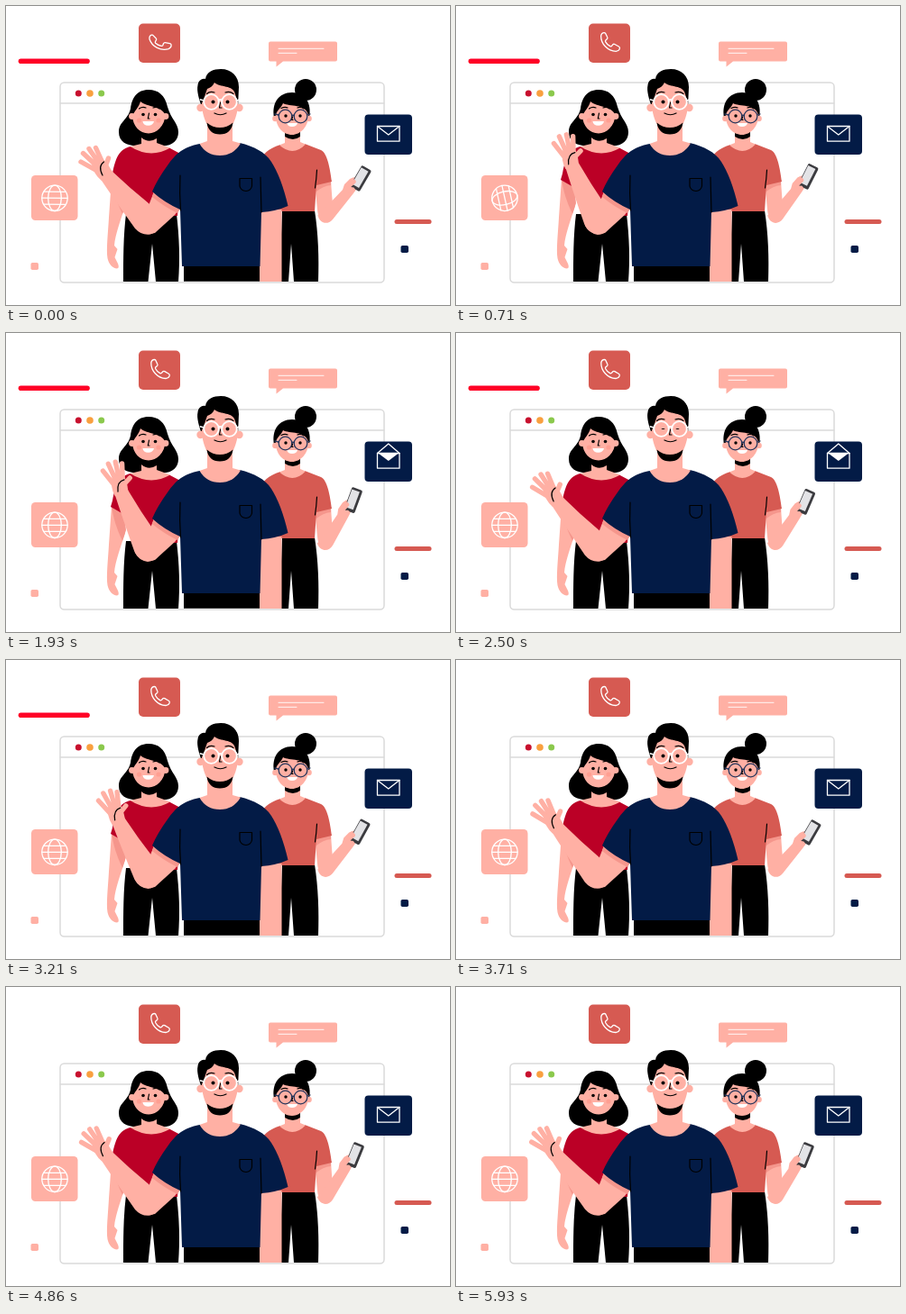
An HTML page for the animation above (6 s loop, 492x332 px).

```html
<!DOCTYPE html>
<html lang="en">
<head>
<meta charset="utf-8">
<title>Team greeting</title>
<style>
html, body { margin: 0; width: 100%; height: 100%; overflow: hidden; background: #fff; }
svg { display: block; width: 100%; height: 100%; fill: none; stroke-linecap: round; stroke-linejoin: round; }
.skin { fill: #ffb0a4; }
.shade { fill: #f5968c; }
.coral { fill: #d65a52; }
.red { fill: #bb0026; }
.navy { fill: #031b46; }
.ink { fill: #000; }
.white { fill: #fff; }
.line { stroke: #000; stroke-width: 1.2; }
.icon { stroke: #fff; stroke-width: 1.3; }
.finger { stroke: #ffb0a4; stroke-width: 5.4; }
.frame { stroke: #dadada; stroke-width: 1.5; }
</style>
</head>
<body>
<svg viewBox="0 0 492 332">
  <!-- browser window -->
  <rect class="frame" x="60" y="85" width="359" height="222" rx="4.5" fill="#fff"/>
  <path class="frame" d="M60 108H419"/>
  <circle cx="80.3" cy="97" r="3.5" fill="#c8102e"/>
  <circle cx="93" cy="97" r="3.8" fill="#f9a03f"/>
  <circle cx="105.7" cy="97" r="3.5" fill="#8bc94d"/>

  <!-- loose shapes -->
  <path id="bar" d="M16.5 61.3H90" stroke="#ff0026" stroke-width="5.6"/>
  <path d="M433 239.5H469" stroke="#d65a52" stroke-width="5"/>
  <rect class="skin" x="27.5" y="285" width="8.5" height="8" rx="1.8"/>
  <rect class="navy" x="437.5" y="266" width="8.5" height="8" rx="1.8"/>
  <path class="skin" d="M293 39.5H365Q367 39.5 367 41.5V59.5Q367 61.5 365 61.5H307L299.5 67.5V61.5H293Q291 61.5 291 59.5V41.5Q291 39.5 293 39.5Z"/>
  <path stroke="#fff" stroke-width=".9" d="M302 47.3H352M302 52.3H322"/>

  <!-- icon tiles -->
  <rect class="coral" x="147" y="19.5" width="46" height="43.5" rx="5"/>
  <path id="call" class="icon" d="M164.5 29.5Q161.500 29.500 160.800 33C160.500 42 168 50 177 50.500Q181 50 181.300 46.800Q181.300 45.800 180.300 45.200L175.800 42.600Q174.600 42 173.600 43L172.300 44.600Q171.600 45.200 170.600 44.600Q167 42.500 165.600 39.500Q165.200 38.500 166 37.800L167.600 36.400Q168.400 35.600 167.800 34.500L165.800 30.200Q165.300 29.500 164.500 29.500Z"/>

  <rect class="skin" x="28" y="188" width="51.5" height="50" rx="4.5"/>
  <g id="globe" class="icon">
    <circle cx="54" cy="213.300" r="14.200"/>
    <ellipse cx="54" cy="213.300" rx="7.300" ry="14.200"/>
    <path d="M39.800 213.300H68.200M42 206.300H66M42 220.300H66"/>
  </g>

  <rect class="navy" x="397.500" y="120.500" width="52.500" height="44.500" rx="4"/>
  <rect class="icon" x="411.500" y="133.500" width="24.500" height="16.700"/>
  <path id="letter" class="white" d="M412.500 133.500H435L423.800 142Z"/>
  <path id="flap" class="icon"/>

  <!-- woman on the left -->
  <path class="ink" d="M158 93C145 93 139.500 102 138 114C135 127 125 128 125 140C125 152 136 156 148 155H169C183 157 191 150 191 140C191 130 183 126 179 112C176 99 169 93 158 93Z"/>
  <path class="skin" d="M117 192C116 206 115 220 114 235C113 253 111 270 112.500 280C114 287 118 291 123 291.500Q126 291 124 286L120.500 279L123.500 270L120 266C121 254 127 238 132 222L132 198Z"/>
  <path class="shade" d="M117 192L131 200L133 219L129 231Q119 210 117 192Z"/>
  <path class="ink" d="M133 231H189C192 256 193 281 191 306H166L162 264L157.500 306H130C130 280 130 255 133 231Z"/>
  <path class="red" d="M138 156C127 159 122 165 118 186L116 193L130 201L142 233H190L195 165L180 157Z"/>
  <path class="skin" d="M150 138H167V152L182 157.500Q160 170 137.500 156L150 153Z"/>
  <path class="ink" d="M150 136H167V147Q158 153 150 146Z"/>
  <circle class="skin" cx="139.500" cy="122.500" r="3.400"/>
  <circle class="skin" cx="177" cy="122.500" r="3.400"/>
  <path class="skin" d="M140 122C142 117 147 113 149 106C157 113 172 110 176.500 121C176 133 167 141.500 158 141.500C148 141.500 140.500 133 140 122Z"/>
  <path class="line" d="M147.500 114Q151 111.500 155 113M163 113Q167 111.500 170 114M158.500 119L157.300 125H159"/>
  <circle class="ink" cx="152" cy="120.500" r="1.800"/>
  <circle class="ink" cx="165.500" cy="120.500" r="1.800"/>
  <path class="white" d="M151.500 128H164Q163 132.800 157.500 132.800T151.500 128Z"/>
  <circle cx="147.500" cy="127" r="2.600" fill="#ff9f92"/>
  <circle cx="169" cy="127" r="2.600" fill="#ff9f92"/>

  <!-- woman on the right -->
  <circle class="ink" cx="332" cy="93" r="12"/>
  <path class="ink" d="M297 124C294 108 302 96 317 96C331 96 339 107 336 124Z"/>
  <path class="ink" d="M306 227H342C346 252 347 280 346 306H319L316 264L313 306H303Z"/>
  <path class="skin" d="M342 194L360 192Q361 214 363 226L357 240Q346 240 345 226Z"/>
  <path class="shade" d="M343 198L360 194V199Q351 200 344 206Z"/>
  <g id="phoneArm">
    <path class="skin" d="M345.500 232C347 241 356 244 362 237L385 208L390 201L392 192Q388 188 381 192L375 198L373 204L354 224Z"/>
    <g transform="rotate(30 393 191.500)">
      <rect x="386.800" y="178" width="12.500" height="27" rx="2" fill="#3b3b3f"/>
      <rect x="387.500" y="180.500" width="9" height="21" fill="#e3e3e6"/>
    </g>
    <path class="finger" d="M378 201L385 195M380 205L384 204"/>
  </g>
  <path class="coral" d="M304 154C290 159 285 163 280 175L302 228H342L344 199L361 195C359 180 356 163 349 160L331 153Z"/>
  <path class="line" d="M344.500 182Q344 192 342.500 202"/>
  <path class="skin" d="M309 138H326V151L332 153.500Q318 168 303 154.500L309 152Z"/>
  <path class="ink" d="M309 138H326V145Q318 151 309 145Z"/>
  <circle class="skin" cx="298.500" cy="125" r="3.300"/>
  <circle class="skin" cx="335.500" cy="125" r="3.300"/>
  <path class="skin" d="M299 121C300 116 305 113 307 108C314 112 332 108 335 121C335.500 134 326 143 317 143C307 143 298.500 134 299 121Z"/>
  <g stroke="#26365c" stroke-width="1.300">
    <circle cx="309.500" cy="122.500" r="7.300"/>
    <circle cx="326.500" cy="122.500" r="7.300"/>
    <path d="M316.500 122Q318 120.500 319.500 122M302 121L298 120M334 121L337 120"/>
  </g>
  <path class="line" d="M305 113.500Q309 111.500 312 113M323 113Q326 111.500 330 114M317.500 123L316.800 126.500H318"/>
  <circle class="ink" cx="310" cy="122" r="1.700"/>
  <circle class="ink" cx="326" cy="122" r="1.700"/>
  <path class="white" d="M311.500 130H323Q322 134 317 134T311.500 130Z"/>

  <!-- man -->
  <path class="skin" d="M164 206L192 225L187 232L165 252Q150 256 143 244L159 219Z"/>
  <path class="shade" d="M164 206L193 225L190 230Q174 222 162 212Z"/>
  <g id="forearm">
    <path class="skin" d="M102 188L117 183Q137 202 158 219L171 236Q171 250 160 253.500Q150 255 143 247Q120 215 102 188Z"/>
    <g id="hand">
      <path class="finger" d="M101 183L83 173M101 178L85.500 163.500M104 176L92 158.500M107 174L99.500 157.500"/>
      <path class="skin" d="M95 175L104 169Q110 171 113 176L119 186L106 194Q97 187 95 175Z"/>
      <path class="finger" d="M109 181L113.500 169"/>
      <path class="line" d="M108.500 173Q101.500 178 107 188"/>
    </g>
  </g>
  <path class="skin" d="M281 226H305.500V306H281Z"/>
  <rect class="ink" x="197" y="287" width="84" height="18.800"/>
  <path class="navy" d="M214.500 153C196 157 189 163 179 177Q168 192 162 206Q175 218 193 226L195 289H281.500L283 229Q299 228 312.500 222Q305 190 294 173C287 162 275 156 259 152Z"/>
  <path class="line" d="M193 188Q192 208 193.500 227M282 190L283 229M259 191.500H272.500V200Q271.500 205 266 205.500Q260 205 259 200Z"/>
  <path class="skin" d="M223 132H251V150L260 152.500Q252 166 237 166Q222 166 214.500 153L223 150Z"/>
  <path class="ink" d="M217 112C214 104 211 94 212.500 88C213 83 217 80 221 81C222 73 230 70 238 70C250 70 258 78 258 90L257 112Z"/>
  <circle class="skin" cx="215.500" cy="113" r="4.200"/>
  <circle class="skin" cx="258.500" cy="113" r="4.200"/>
  <path class="skin" d="M217 108C220 102 221 97 223 92C226 91 229 89 231 85C237 91 252 87 254 98L257 108C257 118 254 126 251 132Q246 140 237 140T223 132C220 126 217 118 217 108Z"/>
  <path class="ink" d="M222.500 129.500Q229 135 237 135T251.500 129.500Q249.500 142.500 237 142.500T222.500 129.500Z"/>
  <path class="line" d="M222.500 97.500Q226 94 231 96M243 96Q248 94 252 97.500M237.500 107L236.500 113H239M231 119Q237.500 122.500 244 119"/>
  <g stroke="#fff" stroke-width="1.800">
    <circle cx="227.500" cy="106.500" r="8.300"/>
    <circle cx="247.500" cy="106.500" r="8.300"/>
    <path d="M235.500 105Q237.500 103 239.500 105M219.500 105L215.500 104M255.500 105L259 104"/>
  </g>
  <g id="eyes" class="ink">
    <circle cx="229.500" cy="106.500" r="2"/>
    <circle cx="245.500" cy="106.500" r="2"/>
  </g>
</svg>
<script>
const LOOP = 6000;
const el = id => document.getElementById(id);
const clamp = x => Math.min(1, Math.max(0, x));
const ease = x => (1 - Math.cos(Math.PI * clamp(x))) / 2;
const swing = (t, period) => (1 - Math.cos(2 * Math.PI * t / period)) / 2;
const turn = (id, angle, x, y) => el(id).setAttribute('transform', `rotate(${angle} ${x} ${y})`);

function draw(t) {
  // waving arm and phone arm
  const wave = swing(t, 1200);
  turn('forearm', 18 * wave, 157, 243);
  turn('hand', 7 * wave, 109, 187);
  turn('phoneArm', -10 * swing(t, 3600), 355, 236);

  // ringing handset, spinning globe
  const ring = 1 - clamp(t / 1200);
  turn('call', -20 * ring * Math.cos(2 * Math.PI * t / 400), 170.5, 40);
  turn('globe', -360 * (1 - clamp(t / 1800)) ** 2.5, 54, 213.3);

  // envelope opens, then closes
  const open = ease((t - 700) / 550) - ease((t - 2520) / 560);
  el('flap').setAttribute('d', `M411.5 133.5L423.8 ${143 - 20 * open}L436 133.5`);
  el('letter').setAttribute('opacity', open);

  // blink
  const lid = Math.max(0.1, clamp(Math.abs(t - 2540) / 130));
  el('eyes').setAttribute('transform', `translate(0 106.5) scale(1 ${lid}) translate(0 -106.5)`);

  el('bar').setAttribute('visibility', t < 3600 ? 'visible' : 'hidden');
}

const start = performance.now();
function tick() {
  draw((performance.now() - start) % LOOP);
  requestAnimationFrame(tick);
}
tick();
</script>
</body>
</html>
```
